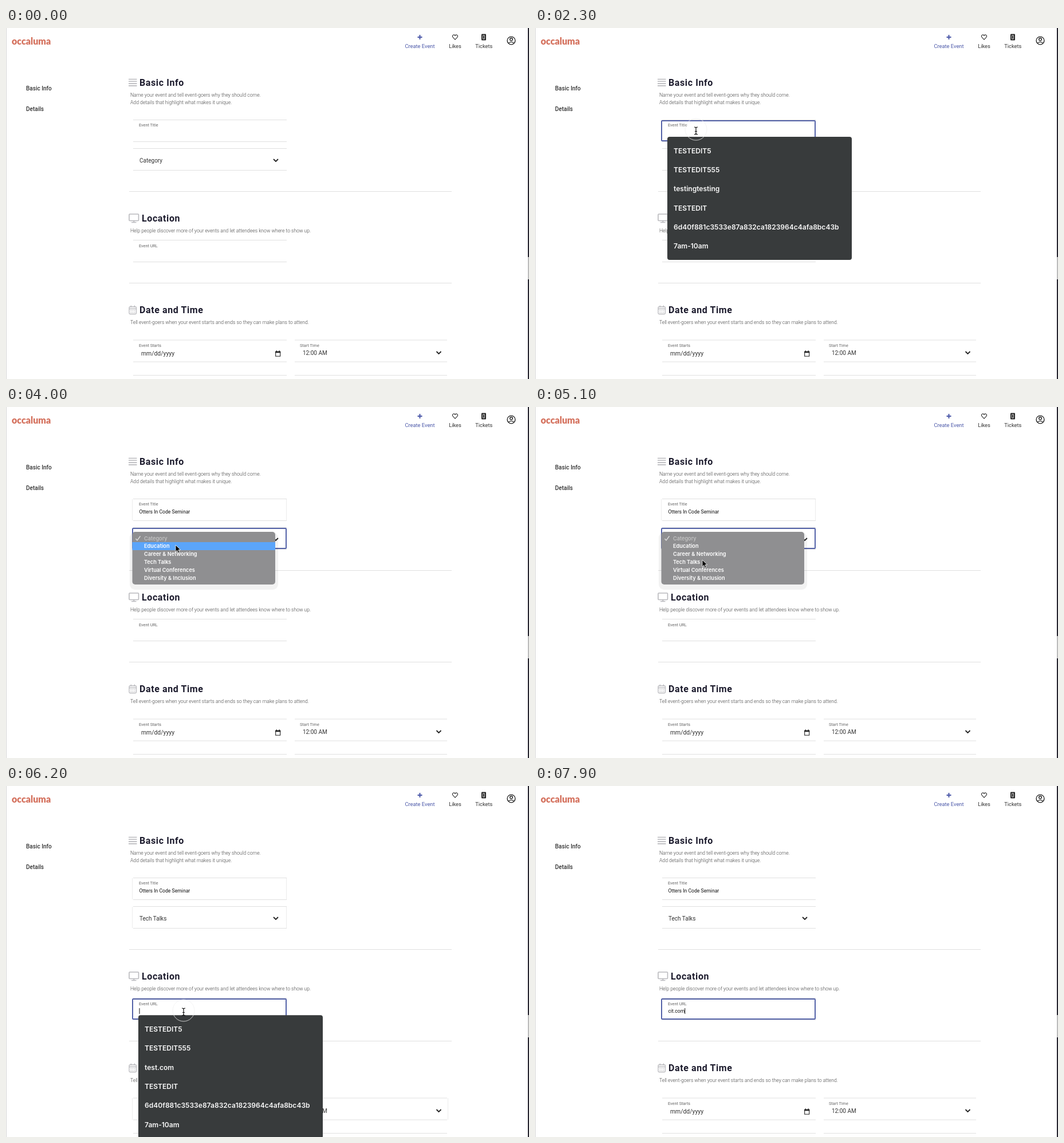
An HTML page that plays this animation: 913x613 px, repeating every 8 s.

```html
<!DOCTYPE html>
<html lang="en">
<head>
<meta charset="utf-8">
<title>Create event form</title>
<style>
  html, body { margin: 0; width: 100%; height: 100%; overflow: hidden; background: #fff; }
  svg { display: block; width: 100vw; height: 100vh; font-family: Roboto, sans-serif; }
  text { white-space: pre; fill: #333; }
  .head { font-size: 16px; font-weight: 700; letter-spacing: .6px; fill: #1b1a2c; }
  .sub { font-size: 8.6px; font-weight: 300; fill: #444; }
  .nav { font-size: 10px; font-weight: 500; }
  .menu { font-size: 9.3px; }
  .label { font-size: 7.3px; fill: #666; }
  .value { font-size: 10px; fill: #333; }
  .date { font-size: 10.4px; }
  .typed { font-size: 8.65px; fill: #111; }
  .logo { font: 900 16px Lato, sans-serif; fill: #d4705c; }
  .fill { font: 600 12.05px Inter, sans-serif; fill: #f8f8f8; }
  .option { font: 600 9.2px Inter, sans-serif; fill: #fff; }
  .line { stroke: #e0e0e0; fill: none; }
  .side { stroke: #ececec; fill: none; }
  .icon { stroke: #b9b9bd; fill: none; stroke-width: 1.6; }
  .dark { stroke: #222; fill: none; stroke-width: 1.4; }
  .focus { stroke: #5462a8; fill: none; stroke-width: 2; }
</style>
</head>
<body>
<svg id="stage" viewBox="0 0 913 613" preserveAspectRatio="none"></svg>
<script>
const LOOP = 8000;
const TITLE = "Otters In Code Seminar", URL_TEXT = "cit.com";
const HASH = "6d40f881c3533e87a832ca1823964c4afa8bc43b";

const text = (x, y, cls, str, attrs = "") =>
  `<text x="${x}" y="${y}" class="${cls}" ${attrs}>${str.replace("&", "&amp;")}</text>`;
const path = (d, cls, attrs = "") => `<path d="${d}" class="${cls}" ${attrs}/>`;
const group = (id, body) => `<g id="${id}">${body}</g>`;
const field = (x, y, w) => path(`M${x} ${y}h${w}m0 38h${-w}`, "line");
const chevron = (x, y) => path(`M${x - 4} ${y - 2}l4 4 4-4`, "dark", 'style="stroke-width:1.8"');
const focusBox = (id, y) =>
  `<rect id="${id}" class="focus" x="221" y="${y}" width="268" height="35" rx="1"/>`;

function autofill(id, y, third) {
  const rows = ["TESTEDIT5", "TESTEDIT555", third, "TESTEDIT", HASH, "7am-10am"];
  return group(id,
    `<rect x="231" y="${y}" width="322" height="215" rx="4" fill="#383b3c"/>` +
    rows.map((s, i) => text(242, y + 28.5 + 33.35 * i, "fill", s)).join(""));
}

function dropdown() {
  const rows = ["Category", "Education", "Career & Networking", "Tech Talks",
    "Virtual Conferences", "Diversity & Inclusion"];
  return group("list",
    `<rect x="216" y="219" width="259" height="100" rx="9" fill="#000" opacity=".05"/>
     <rect x="220.5" y="218" width="249.5" height="92" rx="5" fill="#8f8f91"/>
     <rect id="hover" x="220.5" width="249.5" height="14" fill="#5ba5fa"/>` +
    path("M226.5 230l2.5 3 5.5-7.5", "", 'fill="none" stroke="#ddd" stroke-width="1.3"') +
    rows.map((s, i) => text(241, 232.5 + 13.9 * i, "option", s,
      i ? "" : 'style="fill:#c8c8c8;font-weight:500"')).join(""));
}

const page = [
  // window edges
  `<path d="M911 0h2v400h-2zM911 439h2v174h-2z" fill="#24232e"/>
   <path d="M911 400h2v39h-2z" fill="#bbb"/><path d="M0 0h.8v613h-.8z" fill="#ccc"/>`,
  text(10, 29, "logo", "occaluma"),
  // top menu
  path("M722.5 12v8m-4-4h8", "", 'stroke="#4a57a8" stroke-width="2"'),
  text(722.5, 35, "menu", "Create Event", 'text-anchor="middle" style="fill:#4a57a8"'),
  path("M784 20.2c-2.6-2.4-4.6-4-4.6-5.9 0-2.7 3.4-3.2 4.6-1 1.2-2.2 4.6-1.7 4.6 1 0 1.9-2 3.5-4.6 5.9z",
    "dark", 'style="stroke-width:1.1"'),
  text(784, 35, "menu", "Likes", 'text-anchor="middle"'),
  `<rect x="830" y="10.5" width="8" height="11" rx="1" fill="#222"/>
   <rect x="832.5" y="13" width="3" height="6" fill="none" stroke="#fff" stroke-width=".8"/>`,
  text(834.3, 35, "menu", "Tickets", 'text-anchor="middle"'),
  `<g class="dark"><circle cx="882" cy="22" r="6.9"/><circle cx="882" cy="19.8" r="2.3"/>
   <path d="M877.2 26.6c2.4-3 7.2-3 9.6 0"/></g>`,
  // side menu
  text(35, 109, "nav", "Basic Info"),
  text(35, 145, "nav", "Details"),
  // basic info
  path("M214 89.5h14.5m0 3.8h-14.5m0 3.8h14.5m0 3.8h-14.5", "icon"),
  text(233, 101.4, "head", "Basic Info"),
  text(217, 119.8, "sub", "Name your event and tell event-goers why they should come."),
  text(217, 132.8, "sub", "Add details that highlight what makes it unique."),
  field(222, 160.5, 268),
  path("M220.5 161v37M489.5 161v37", "side", 'id="titleSides"'),
  text(232, 172.2, "label", "Event Title"),
  field(222, 210.5, 268),
  text(233, 234.5, "value", "", 'id="category"'),
  chevron(471, 231),
  path("M215 285.5h563", "line"),
  // location
  `<g class="icon"><rect x="215" y="325" width="16.5" height="11.5" rx="1"/><path d="M219 339.5h8.5m-4.2-3v3"/></g>`,
  text(237, 338.4, "head", "Location"),
  text(217, 356.7, "sub", "Help people discover more of your events and let attendees know where to show up."),
  field(222, 370.5, 268),
  text(232, 382.6, "label", "Event URL"),
  path("M215 445.5h563", "line"),
  // date and time
  `<g class="icon" style="stroke-width:1.3"><rect x="215" y="487" width="12.5" height="12.5" rx="1.5"/>
   <path d="M215 490.5h12.5M218.3 484.5v3m6-3v3"/>
   <path d="M217.5 493.7h8m0 3h-8" stroke-dasharray="1.6 1.6"/></g>`,
  text(233, 498.4, "head", "Date and Time"),
  text(217, 516.9, "sub", "Tell event-goers when your event starts and ends so they can make plans to attend."),
  field(222, 545, 268), field(504, 545, 266),
  path("M220.5 211v37M489.5 211v37M220.5 545v38M771.5 545v38", "side", 'id="otherSides"'),
  text(232, 556.6, "label", "Event Starts"),
  text(236, 572, "value date", "mm/dd/yyyy"),
  `<path d="M470.7 565.3h8v8h-8z" class="dark" style="stroke-width:1.1"/>
   <path d="M470.2 564.7h9v2.6h-9zM471.7 563.3h1.3v2h-1.3zM476.5 563.3h1.3v2h-1.3z" fill="#222"/>`,
  text(513, 556.6, "label", "Start Time"),
  text(518, 570.6, "value", "12:00 AM"),
  chevron(755.5, 567),
  path("M222 606.5h268M504 606.5h266", "line"),
  // live parts
  text(232.5, 186.3, "typed", "", 'id="title"'),
  text(232.5, 396.3, "typed", "", 'id="url"'),
  focusBox("focusTitle", 162), focusBox("focusCategory", 212), focusBox("focusUrl", 372),
  `<path id="caret" d="M0 0v10" stroke="#111"/>`,
  autofill("fillTitle", 190, "testingtesting"),
  autofill("fillUrl", 400.3, "test.com"),
  dropdown(),
  `<circle id="ring" r="19" fill="none" stroke="#f0f0f0" stroke-width=".8"/>
   <path id="arrow" d="M0 0v12l2.8-2.6 2 4.5 2.1-.9-2-4.4h3.9z" fill="#000" stroke="#fff" stroke-width=".8"/>
   <path id="beam" d="M-3-6.5q3 0 3 2v9q0 2-3 2M3-6.5q-3 0-3 2v9q0 2 3 2M-2 1h4" fill="none" stroke="#111" stroke-width="1.2"/>`
];
document.getElementById("stage").innerHTML = page.join("");

const $ = id => document.getElementById(id);
const show = (id, on) => $(id).setAttribute("visibility", on ? "visible" : "hidden");
const move = (id, x, y) => $(id).setAttribute("transform", `translate(${x} ${y})`);
const typed = (str, t, from, to) =>
  str.slice(0, Math.max(0, Math.round(str.length * Math.min(1, (t - from) / (to - from)))));

// pointer stops: time, x, y
const route = [[600, 360, 436], [900, 315, 250], [1100, 281, 177], [3300, 281, 177],
  [3600, 297, 229], [3800, 297, 229], [4000, 296, 241], [4400, 296, 243],
  [4900, 292, 267], [5300, 292, 267], [5900, 310, 392], [LOOP, 310, 392]];

function pointer(t) {
  const i = Math.max(1, route.findIndex(stop => stop[0] > t));
  const [t0, x0, y0] = route[i - 1], [t1, x1, y1] = route[i];
  const k = Math.max(0, (t - t0) / (t1 - t0)), e = k * k * (3 - 2 * k);
  return [x0 + (x1 - x0) * e, y0 + (y1 - y0) * e];
}

function draw(t) {
  const within = (a, b) => t >= a && t < b;
  const [x, y] = pointer(t);
  $("title").textContent = typed(TITLE, t, 2400, 3200);
  $("url").textContent = typed(URL_TEXT, t, 6700, 7500);
  $("category").textContent = t < 5300 ? "Category" : "Tech Talks";

  const inTitle = within(1400, 3600), inUrl = t >= 6000;
  show("titleSides", within(3600, 6600));
  show("otherSides", within(6000, 6600));
  show("focusTitle", inTitle);
  show("focusCategory", within(3600, 6000));
  show("focusUrl", inUrl);
  show("fillTitle", within(1500, 2400));
  show("fillUrl", within(6100, 6700));

  const active = $(inUrl ? "url" : "title");
  const blink = within(2400, 3300) || t >= 6700 || (t - (inUrl ? 6000 : 1400)) % 1000 < 500;
  show("caret", (inTitle || inUrl) && blink);
  move("caret", 233 + active.getComputedTextLength(), inUrl ? 388 : 178);

  const open = within(3700, 5300), row = Math.floor((y - 222.2) / 13.8);
  show("list", open);
  show("hover", open && row > 0 && !within(5000, 5200));
  $("hover").setAttribute("y", 222.2 + 13.8 * row);

  const visible = within(600, 2400) || within(3300, 6700);
  const beam = within(1300, 3400) || t >= 5900;
  show("arrow", visible && !beam);
  show("beam", visible && beam);
  show("ring", within(1100, 2400) || within(6000, 6700));
  move("arrow", x, y);
  move("beam", x, y + 2.5);
  move("ring", x, y);
}

function tick(now) {
  draw(Math.floor(now % LOOP / 100) * 100);
  requestAnimationFrame(tick);
}
draw(0);
requestAnimationFrame(tick);
</script>
</body>
</html>
```
